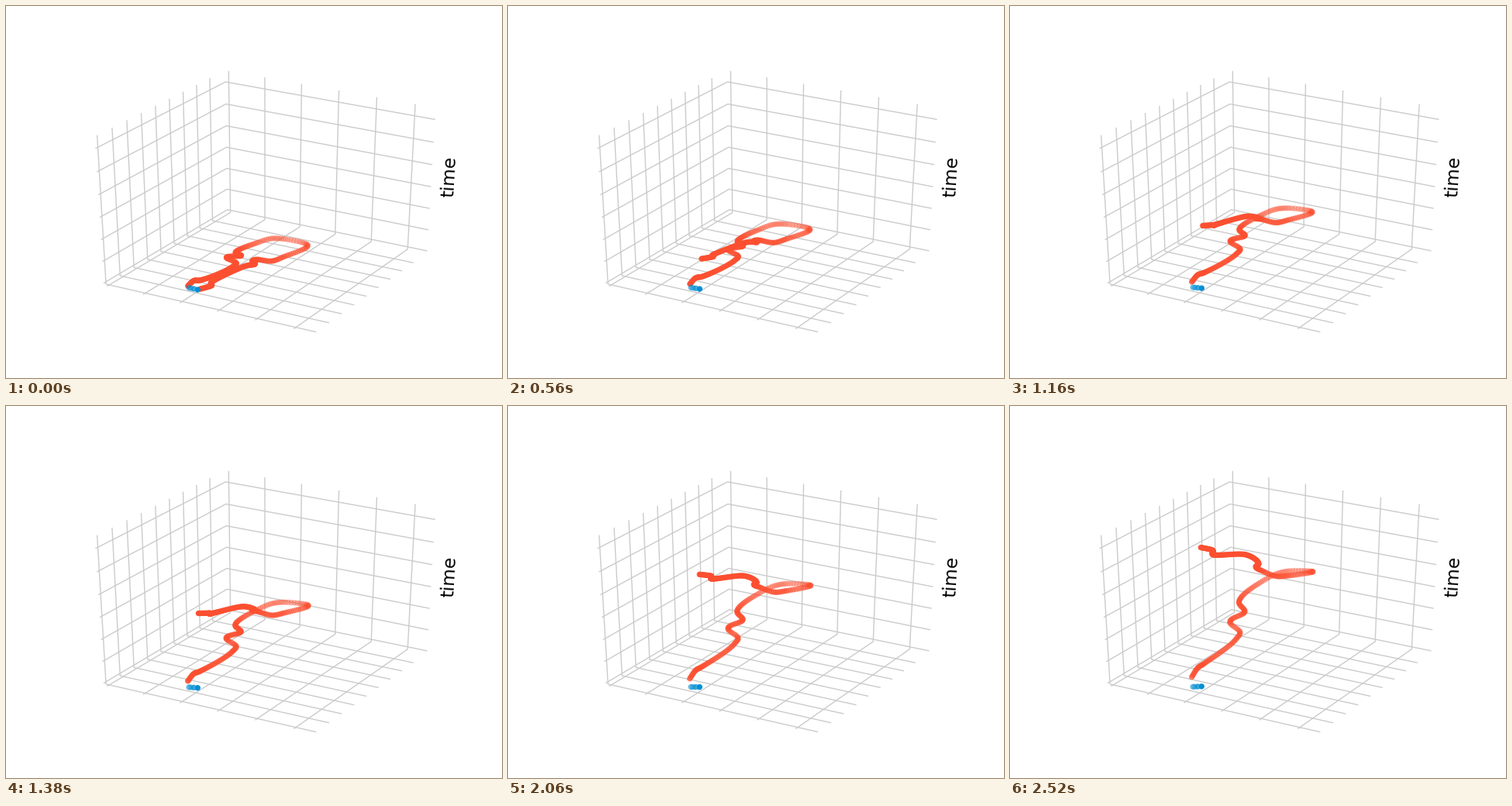
A matplotlib script that plays this animation: 640 by 480 pixels, repeating every 2940 ms.

```python
import numpy as np
import matplotlib.pyplot as plt
from matplotlib.animation import FuncAnimation

W, H, DPI = 640, 480, 100
FRAMES, INTERVAL, LAST = 147, 20, 126
GRID, RED, BLUE = "#cbcbcb", (0.988, 0.310, 0.188), (0.0, 0.561, 0.835)

# Box limits in tick units: ticks sit at x 0..5, y 0..8, z 0..6
X0, X1 = -0.09, 5.51
Y0, Y1 = -0.125, 9.2
Z0, Z1 = -0.11, 6.49
TOP = 6.27         # height reached by the newest dot

# Where the outermost grid lines end on the stage
ANCHORS = {
    (X0, 0, Z0): (128, 358), (X0, 8, Z0): (266, 276.5),
    (X1, 0, Z0): (398.5, 419.7), (X1, 8, Z0): (525, 330),
    (X0, 0, Z1): (117, 167), (X0, 8, Z1): (262.5, 93.5),
    (0, Y0, Z0): (131, 361), (5, Y0, Z0): (372, 416),
    (0, Y1, Z0): (289, 266), (5, Y1, Z0): (517.5, 314),
    (0, Y1, Z1): (287, 84), (5, Y1, Z1): (527.5, 126.5),
}

# Bends of the route: percent of elapsed time, floor position on the stage
BENDS = [
    (6.5, 234.3, 360.6), (9.3, 241.7, 354), (12.1, 249.5, 353.5),
    (21, 292.4, 335.5), (23, 296.9, 331.5), (26, 284.6, 325),
    (33, 303, 321.5), (37.7, 295.6, 317.5), (45.3, 322.2, 305.5),
    (48.2, 341, 299.7), (50.8, 357.3, 300), (54.7, 388.5, 307.7),
    (60, 357, 323.5), (62, 344.5, 328.3), (65.4, 324, 326.6),
    (69, 317.3, 328.8), (72.5, 320.8, 331.7), (81.6, 304, 336.5),
    (90.8, 265, 355.5), (96.8, 263, 361), (100, 250.3, 364.6),
]


def fit_camera(anchors):
    """Least-squares perspective matrix from world to stage points."""
    rows, rhs = [], []
    for point, uv in anchors.items():
        p, zero = np.array([*point, 1.0]), np.zeros(4)
        rows.append([*p, *zero, *(-uv[0] * p[:3])])
        rows.append([*zero, *p, *(-uv[1] * p[:3])])
        rhs += uv
    solution = np.linalg.lstsq(np.array(rows), np.array(rhs), rcond=None)[0]
    return np.append(solution, 1).reshape(3, 4)


CAMERA = fit_camera(ANCHORS)


def project(x, y, z):
    """Stage x, stage y and depth of world points."""
    u, v, w = CAMERA @ np.array([x, y, z, np.ones_like(x)])
    return u / w, v / w, w


def on_floor(u, v):
    """World x and y of stage points lying at height zero."""
    flat = CAMERA[:, [0, 1, 3]]
    x, y, w = np.linalg.solve(flat, np.array([u, v, np.ones_like(u)]))
    return x / w, y / w


def smooth(t, keys, values):
    """Cubic Hermite curve through the key values."""
    slope = np.gradient(values, keys)
    i = np.clip(np.searchsorted(keys, t) - 1, 0, len(keys) - 2)
    step = keys[i + 1] - keys[i]
    q = (t - keys[i]) / step
    rise = values[i + 1] - values[i]
    ease = q * q * (3 - 2 * q)
    bend = q * (1 - q) * ((1 - q) * slope[i] - q * slope[i + 1])
    return values[i] + rise * ease + step * bend


def draw_grid(ax):
    lines = [[(i, Y0, Z0), (i, Y1, Z0), (i, Y1, Z1)] for i in range(6)]
    lines += [[(X1, j, Z0), (X0, j, Z0), (X0, j, Z1)] for j in range(9)]
    lines += [[(X0, Y0, k), (X0, Y1, k), (X1, Y1, k)] for k in range(7)]
    for line in lines:
        u, v, _ = project(*np.array(line, float).T)
        ax.plot(u, v, color=GRID, lw=1, zorder=1)


class Cloud:
    """Depth-shaded dots rising from the floor."""

    def __init__(self, ax, t, u, v, color, zorder):
        self.t, self.color = t, color
        self.x, self.y = on_floor(u, v)
        self.dots = ax.scatter(u, v, s=20, lw=0.8, zorder=zorder)

    def update(self, tau):
        u, v, depth = project(self.x, self.y, TOP * self.t * tau)
        order = np.argsort(-depth)
        alpha = 1 - 0.7 * (depth - depth.min()) / np.ptp(depth)
        rgba = np.column_stack([np.tile(self.color, (len(u), 1)), alpha])
        self.dots.set_offsets(np.column_stack([u, v])[order])
        self.dots.set_color(rgba[order])


fig = plt.figure(figsize=(W / DPI, H / DPI), dpi=DPI, facecolor="white")
ax = fig.add_axes([0, 0, 1, 1])
ax.set_xlim(-0.5, W - 0.5)
ax.set_ylim(H - 0.5, -0.5)
ax.axis("off")

draw_grid(ax)
ax.text(572.1, 219.4, "time", rotation=86.6, fontsize=16.8, color="black",
        family="DejaVu Sans", ha="center", va="center")

keys, key_u, key_v = np.array(BENDS).T
t = np.linspace(keys[0], keys[-1], 250)
route = Cloud(ax, t / 100, smooth(t, keys, key_u), smooth(t, keys, key_v),
              RED, 2)
q = np.linspace(0, 1, 5) ** 1.9
start = Cloud(ax, 0.007 + 0.017 * q, 235.3 + 11.5 * q, 363 + 2.5 * q, BLUE, 3)


def update(frame):
    tau = min(frame, LAST) / LAST
    route.update(tau)
    start.update(tau)
    return route.dots, start.dots


anim = FuncAnimation(fig, update, frames=FRAMES, interval=INTERVAL,
                     repeat=True, repeat_delay=0, blit=False)
plt.show()
```
